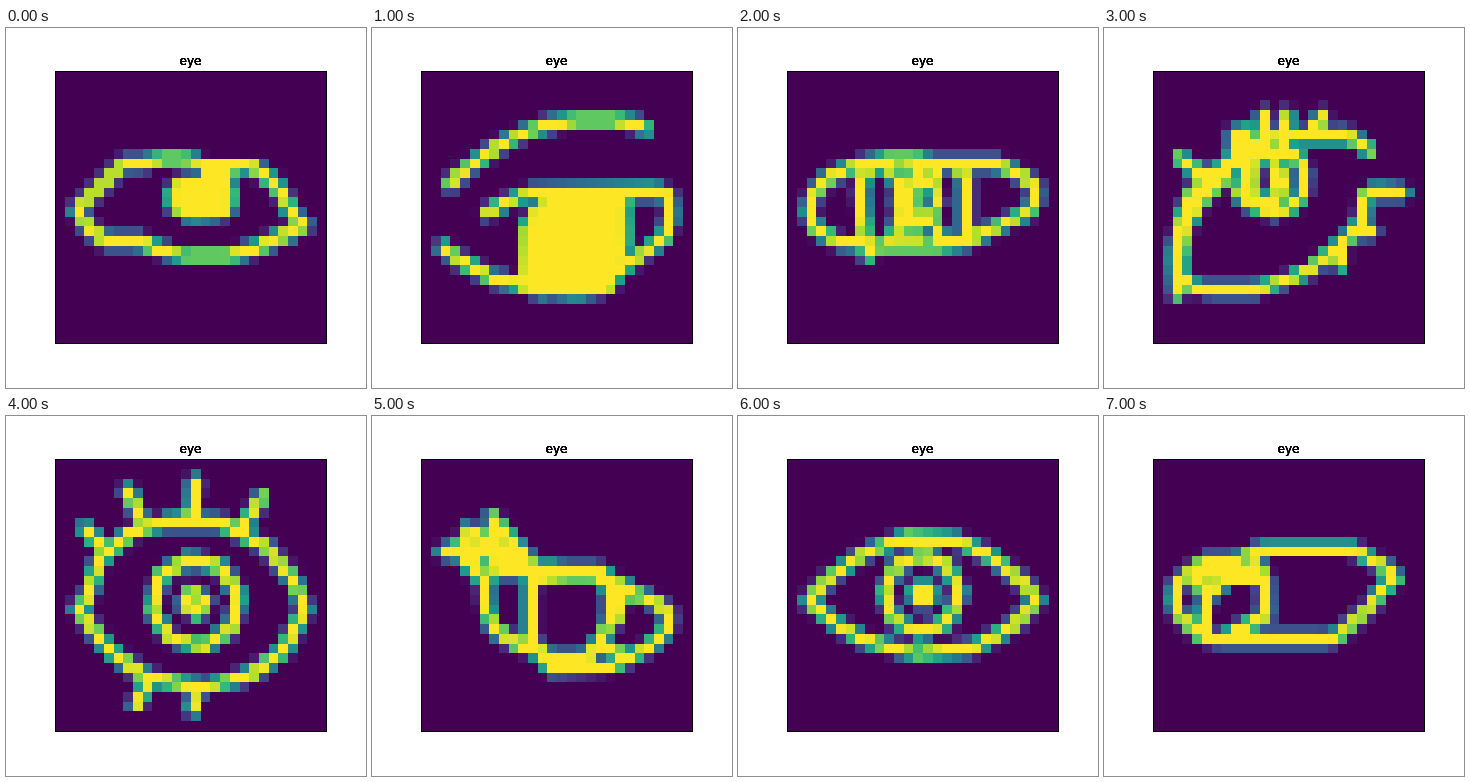
Animation, 360 px wide and 360 px high, one loop 8 s. Source, as an HTML page with a canvas:

```html
<!DOCTYPE html>
<html lang="en">
<head>
<meta charset="utf-8">
<title>eye</title>
<style>
  html, body { margin: 0; width: 100%; height: 100%; overflow: hidden; background: #fff; }
  canvas { position: absolute; left: 0; top: 0; }
  h1 {
    position: absolute; left: 49px; top: 26px; width: 271px; margin: 0;
    font: 12px/14px "DejaVu Sans", sans-serif; text-align: center; color: #000;
    text-shadow: 0 0 0 #000, 0 0 0 #000, 0 0 0 #000, 0 0 0 #000, 0 0 0 #000;
  }
</style>
</head>
<body>
<canvas id="plot" width="360" height="360"></canvas>
<h1>eye</h1>
<script>
const SIDE = 28, STEP = 1000, CELL = 9.69, LEFT = 49.4, TOP = 43.4;
const PEN = 1.474;

const VIRIDIS = ['440154', '482878', '3e4a89', '31688e', '26828e',
  '1f9e89', '35b779', '6dcd59', 'b4de2c', 'fde725']
  .map(hex => [0, 2, 4].map(i => parseInt(hex.slice(i, i + 2), 16)));

// Pen strokes in grid units; "fill" is a scribbled-in area.
const DRAWINGS = [
  {
    pen: `M7 9.45 L9 9.4 L11 9.1 L13.2 9.05 L15 9.4 L18 9.7 L20.5 9.8 L22.4 11.3 L23.6 13
      L24.5 14.8 L25.7 15.9 L24.5 16.5 L20.6 18.2 L18 19.05 L13.5 19.1 L10.5 18.3 L8.6 17.5
      L5 17.4 L3.4 16.1 L2.21 14.3 L3.5 12.9 L7 9.45 M15.5 10.4 L17.8 10.7`,
    fill: 'M12.9 11.5 L17.6 11.5 L17.95 12.2 L17.9 14 L17.3 14.5 L14 14.8 L12.2 13.9 L12.1 12.4 Z'
  },
  {
    pen: `M2.9 11.6 L5.6 9.3 L8 7.6 L10.5 6.4 L13 5.5 L16 5.05 L20 5.03 L22.3 5.5 L23.2 5.9
      M6.7 14.6 L8.5 13.6 L11.5 12.4 L24 12.3 L25.5 12.8 L25.7 15 L25.1 17.2 L22.5 19 L20.4 20.3
      M2.21 18.1 L4 19.5 L7 21.2 L10.5 22`,
    fill: `M11.9 14.3 L14 13 L20.8 13 L20.9 17.6 L20.3 18.9 L20 21 L19.2 22.3 L16 22.8
      L13.5 22.4 L12 22.7 L10.8 22.1 L10.9 16 Z`
  },
  {
    pen: `M8.4 19 L7.8 16 L7.6 12 L8 10.4 L9.8 9.5 M8.4 17.9 L15.5 17.9 L18.5 17.5 L22.5 15.7
      L24.6 14.7 L25.5 13.6 L25.6 11.9 L24 10.7 L21.5 9.5 L15 9.4 L13.2 9.05 L10.5 9.1
      L7 9.7 L4.2 11 L2.6 12.8 L2.21 14.5 L3 16.4 L5 17.4 L8.4 17.7
      M13 9 L13 17 M17.4 9.6 L18.4 11.2 L18.4 17.4
      M13.2 10.3 L15 11.7 L15.5 13.5 L14.6 15.2 L12.3 15.3 L11.5 14 L11.6 12 L13.4 11.6
      M10.7 10.2 L11.6 11.8 M15.4 9.8 L15.2 11.3 M11.6 15.2 L10.9 17.2 M14.6 15.2 L15.8 16.8`
  },
  {
    pen: `M2.7 8.9 L4.6 10.4 L6.6 10.4 L9 8.2 L13 6.7 L19.8 6.4 L21.3 7.4 L22.3 8.1
      M8.4 6.2 L8.4 9 M11.4 4.5 L11.6 7 M13.8 4.6 L13.5 7.5 M17.4 4.6 L16.4 6.2
      M9.8 6 L9.4 8
      M2.5 23.1 L2.25 19 L3 15 L4.1 12.3 L7.5 9.9 M2.8 20 L3.2 16.3 L4.5 13.8 L7.6 10.8
      M2.5 20.5 L4.2 22.2 L6 22.5 L10.5 22.45 L14 21.4 L16.4 20.3 L18.4 18.5 L21 16.4
      L21.7 14.5 L21.7 12.9 L22.6 12.35 L25.79 12.4 M20.5 16.5 L22.6 16.4 M19.3 18.3 L19.3 20.1
      M8 9.3 L12 8.7 L15 8.7 L15.5 10.3 L15.4 12.8 L14.2 14 L12.3 14.5 L10.3 13.9 L8.8 12.6
      L9.6 10 L10 8.7 M10.2 9.5 L10.1 13 L12 13.4 L13.2 12.4 L13.4 10.8 L12.6 10.2 L12.6 11.6`
  },
  {
    pen: `M3.2 14.6 L4.5 10.5 L7.6 7.6 L12 6.2 L17 6.5 L21.5 8.8 L24.6 12.4 L25.79 15.4
      L23.6 19.6 L20 22.3 L15 23.6 L9.5 22.6 L5.5 19.6 L2.21 15.3
      M13.6 10.3 L17 11 L18.9 14 L18.2 17.4 L15.2 19.3 L11.8 18.4 L10 15.6 L10.8 12 L13.6 10.3
      M14 13.6 L15.6 14.6 L14.6 16 L13.2 15 Z
      M14.2 6.2 L14.4 2.21 M9.3 7 L7.4 3.2 M19 7.4 L21.3 3.8 M5.3 9.6 L3 7
      M14.5 23.6 L14.2 25.79 M9.6 22.8 L8.3 25.3`
  },
  {
    pen: `M5.2 11.4 L6.6 12.4 L6.7 15.5 L7.4 17.3 L10.3 19.3 L11.6 19.6 L13.4 21.4 L20 21.2
      L23.4 19.4 L25.4 17.4 L25.5 15.8 L24 14.6 L20.6 13.2 L18.4 11.5 L13 11.5 L8 11.6 L6 12
      M12.2 12.2 L18 11.8 L19.5 13.5 L19.5 16.6 L18.2 19 L17 20.4 L13 20.4 L11.3 18.8
      L11.3 12.8 L12.2 12.2 M20.5 12.9 L21.5 13.5 L20.3 14.9 L20.2 16.4 M18.8 19.2 L21.2 20.4
      M2.21 9.4 L3.6 9.3 L5.3 11.3 M4.6 7.2 L5.7 7.7 L7.4 10.3 L8.4 11.2
      M7.3 5.9 L8.6 7.4 L10.4 9.4 L11.5 11.4 M7.4 6.4 L7.4 8.6 L9.4 10.6
      M4.3 8.6 L5.6 9.6 L5.6 11.2 M10.8 11 L14 11.2`
  },
  {
    pen: `M2.21 14.6 L4.6 12 L8 9.6 L12.4 8 L17 8.2 L21 10 L24.2 12.6 L25.79 14.4
      L23 17.4 L18.8 19.6 L13.6 20.1 L8.4 18.8 L4.8 16.8 L2.21 14.6
      M13.8 9.8 L16.6 11 L17.8 13.8 L16.6 16.8 L13.8 17.9 L11 16.6 L10 13.8 L11.2 11 L13.8 9.8`,
    fill: 'M13.3 13.2 L14.7 13.2 L14.7 14.6 L13.3 14.6 Z'
  },
  {
    pen: `M10.2 9.6 L11.5 9.33 L20.8 9.33 L22.6 10.4 L24 11.2 L25.1 12.2 L23.6 13.4 L22.3 15.2
      L19 18.2 L17.8 18.6 L7 18.6 L5 18.2 L2.6 16 L2.21 14.5 L2.4 12.8 L5.2 10.5 L8.6 10.4
      L10.2 9.6 L10.8 11.2 L11.5 12.2 L11.6 16.2 L9.5 17.2 L8 17.9
      M11 12.35 L7.6 12.35 L5.6 13.9 L5.25 15.5 L5.3 18 M5.4 10.8 L5.2 12.2 L4.4 13
      M5.6 11.3 L10 11.7`
  }
];

const ctx = document.getElementById('plot').getContext('2d');
const edge = (start, i) => Math.round(start + i * CELL);

function colour(v) {
  const p = v * (VIRIDIS.length - 1), i = Math.min(Math.floor(p), VIRIDIS.length - 2);
  const rgb = VIRIDIS[i].map((a, k) => Math.round(a + (VIRIDIS[i + 1][k] - a) * (p - i)));
  return `rgb(${rgb})`;
}

// Coverage of the pen on the small grid, 0 to 1 per cell.
function rasterise({ pen, fill }) {
  const grid = document.createElement('canvas');
  grid.width = grid.height = SIDE;
  const g = grid.getContext('2d', { willReadFrequently: true });
  g.lineWidth = PEN;
  g.lineCap = g.lineJoin = 'round';
  g.stroke(new Path2D(pen));
  if (fill) {
    const area = new Path2D(fill);
    g.fill(area);
    g.stroke(area);
  }
  const { data } = g.getImageData(0, 0, SIDE, SIDE);
  return Array.from({ length: SIDE * SIDE }, (_, i) => data[i * 4 + 3] / 255);
}

function paint(cells) {
  ctx.fillStyle = '#fff';
  ctx.fillRect(0, 0, 360, 360);
  ctx.fillStyle = colour(0);
  ctx.fillRect(49, 43, 272, 273);
  cells.forEach((v, i) => {
    if (!v) return;
    const c = i % SIDE, r = Math.floor(i / SIDE);
    const x = edge(LEFT, c), y = edge(TOP, r);
    ctx.fillStyle = colour(v);
    ctx.fillRect(x, y, edge(LEFT, c + 1) - x, edge(TOP, r + 1) - y);
  });
  ctx.strokeStyle = '#000';
  ctx.strokeRect(49.5, 43.5, 271, 272);
}

const images = DRAWINGS.map(rasterise);
const start = performance.now();
let shown = -1;

function tick() {
  const n = Math.floor((performance.now() - start) / STEP) % images.length;
  if (n !== shown) paint(images[shown = n]);
  requestAnimationFrame(tick);
}
tick();
</script>
</body>
</html>
```
